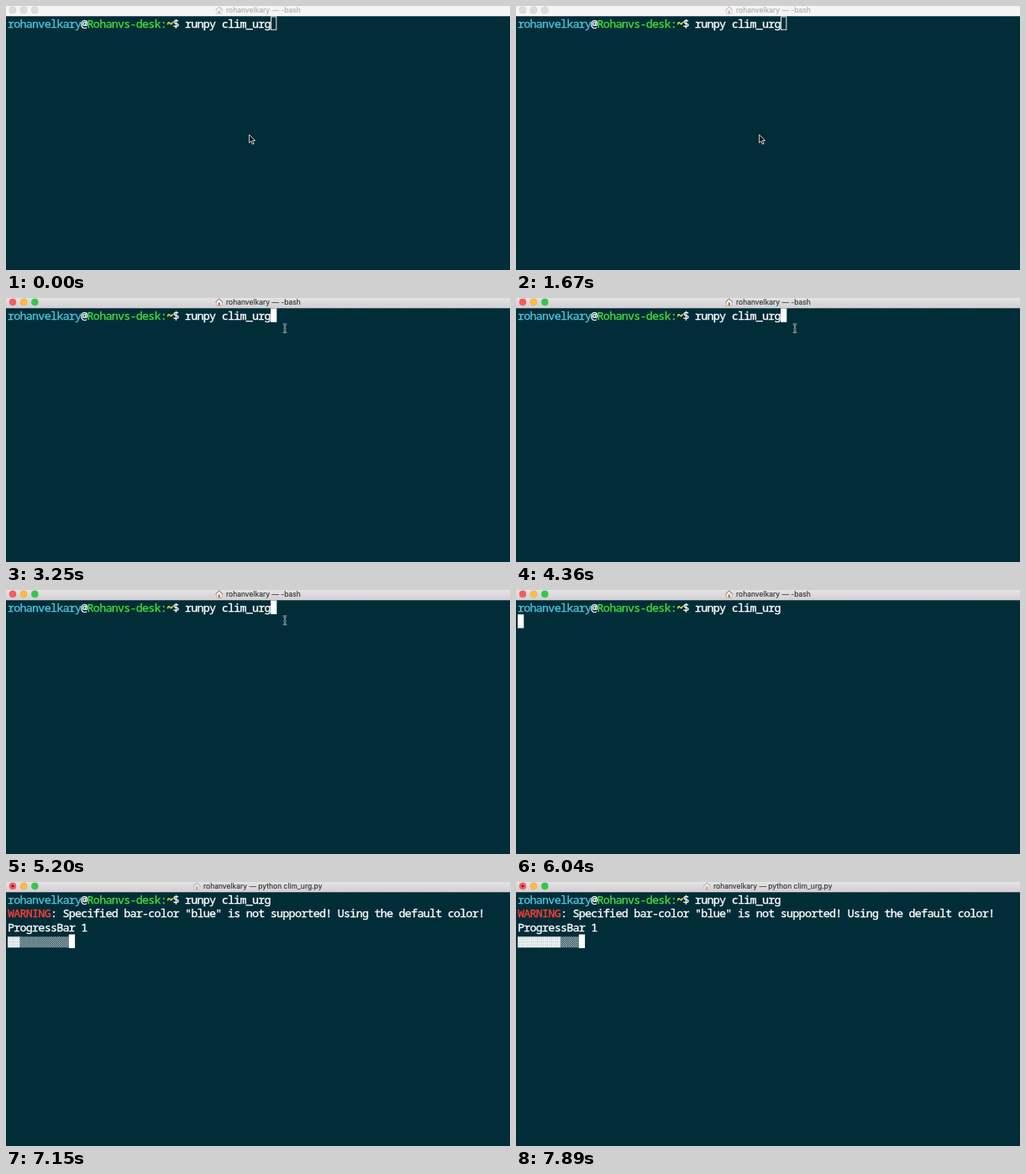
Write an HTML page that moves like this. It is 600 px wide and 315 px high and loops after 7.99 s.

```html
<!DOCTYPE html>
<html lang="en">
<head>
<meta charset="utf-8">
<title>Terminal</title>
<style>
  html, body { margin: 0; width: 100%; height: 100%; overflow: hidden; background: #002d38; }
  svg { display: block; width: 100%; height: 100%; }
  text { white-space: pre; fill: currentColor; stroke: currentColor; }
  tspan { fill: currentColor; stroke: currentColor; }
  .term { font: 500 13.4px "Noto Sans Mono", monospace; letter-spacing: -.76px; color: #fff; stroke-width: .35; }
  .title { font: 8.5px Inter, sans-serif; color: #2b2b2b; stroke-width: .1; }
  .user { color: #4fc3d9; }
  .host { color: #45d93a; }
  .path { color: #f8f23c; font-weight: 700; }
  .warn { color: #ff4034; }
  .lights circle { stroke: #0002; stroke-width: .5; }
  .inactive .title { color: #aaa; }
  .inactive #house { opacity: .5; }
  .inactive .lights circle { fill: #dcdcdc; }
  .inactive #bar { fill: #f5f5f5; }
</style>
</head>
<body>
<svg id="stage" viewBox="0 0 600 315" preserveAspectRatio="none">
  <defs>
    <linearGradient id="chrome" x2="0" y2="1">
      <stop stop-color="#e5e3e5"/><stop offset="1" stop-color="#d0ced0"/>
    </linearGradient>
    <pattern id="light" width="2.427" height="2.6" patternUnits="userSpaceOnUse">
      <path d="M0 0h1.2v1.3h-1.2zM1.2 1.3h1.2v1.3h-1.2z" fill="#d3dcde"/>
    </pattern>
    <pattern id="dense" width="2.427" height="2.6" patternUnits="userSpaceOnUse">
      <path d="M0 0h2.427v2.6h-2.427z" fill="#f0f3f3"/>
      <path d="M.6 .8h1v.9h-1z" fill="#8fa5aa"/>
    </pattern>
  </defs>

  <rect width="600" height="315" fill="#002d38"/>
  <rect id="bar" width="600" height="12.2" fill="url(#chrome)"/>
  <g class="lights">
    <circle cx="8" cy="4.9" r="4.1" fill="#fc5b57"/>
    <circle cx="21" cy="4.9" r="4.1" fill="#fdbc40"/>
    <circle cx="34.3" cy="4.9" r="4.1" fill="#34c84a"/>
  </g>
  <circle id="busyDot" cx="8" cy="4.9" r="1.4" fill="#6b1210"/>
  <g id="house">
    <path d="M1.5 4.5 4.7 1.5 8 4.5v4.7h-6.5z" fill="#fbf6ee" stroke="#8f8780" stroke-width=".5"/>
    <path d="M.3 5 4.7 .9 9.2 5" fill="none" stroke="#86766c" stroke-width="1"/>
    <path d="M3.6 5.4h2.2v3.6h-2.2z" fill="#b5604a"/>
  </g>
  <text id="title" class="title" y="8"></text>

  <text class="term" x="2" y="25.7"><tspan class="user">rohanvelkary</tspan>@<tspan class="host">Rohanvs-desk:</tspan><tspan class="path">~</tspan>$ runpy clim_urg</text>
  <g id="output">
    <text class="term" x="2" y="42.4"><tspan class="warn">WARNING</tspan>: Specified bar-color "blue" is not supported! Using the default color!</text>
    <text class="term" x="2" y="59.1">ProgressBar 1</text>
    <rect id="todo" y="65.2" height="13" fill="url(#light)"/>
    <rect id="done" x="2" y="65.2" height="13" fill="url(#dense)"/>
  </g>
  <rect id="caret" stroke="#e6eaeb" stroke-width="1"/>

  <path id="arrow" d="M0 0v9.6l2.2-2 1.6 3.7 1.7-.7-1.6-3.6h3z" fill="#111" stroke="#fff" stroke-width=".8"/>
  <g id="beam" transform="translate(332 36.3)" fill="none">
    <path d="M-2.2-5Q-.3-5 0-4Q.3-5 2.2-5M0-4V4M-2.2 5Q-.3 5 0 4Q.3 5 2.2 5M-1.5 1h3" stroke="#b9c5c8" stroke-width="2"/>
    <path d="M-2.2-5Q-.3-5 0-4Q.3-5 2.2-5M0-4V4M-2.2 5Q-.3 5 0 4Q.3 5 2.2 5M-1.5 1h3" stroke="#14282f" stroke-width=".8"/>
  </g>
</svg>
<script>
const LOOP = 7990, CELL = 7.28, ROW = 16.7, CELLS = 10;
const MOVE = 1760, ACTIVATE = 2130, ENTER = 5850, RUN = 6310, PRINT = 6800, STEP = 150;
const el = id => document.getElementById(id);
const set = (id, attrs) => {
  for (const name in attrs) el(id).setAttribute(name, attrs[name]);
};
const show = (id, visible) => set(id, { visibility: visible ? 'visible' : 'hidden' });
const smooth = p => p * p * (3 - 2 * p);
const clamp = (v, max) => Math.max(0, Math.min(max, v));

function draw(t) {
  const active = t >= ACTIVATE, running = t >= RUN, printed = t >= PRINT;

  el('stage').classList.toggle('inactive', !active);
  el('title').textContent = 'rohanvelkary — ' + (running ? 'python clim_urg.py' : '-bash');
  set('title', { x: running ? 235 : 262 });
  set('house', { transform: `translate(${running ? 222.5 : 249} 0)`, opacity: running ? .5 : 1 });
  show('busyDot', running);

  const [col, row] = printed ? [CELLS, 3] : t >= ENTER ? [0, 1] : [43, 0];
  const inset = active ? 0 : .5;
  set('caret', {
    x: 2 + col * CELL + inset, y: 12.4 + row * ROW + inset,
    width: CELL - 2 * inset, height: 16.4 - 2 * inset,
    fill: active ? '#fff' : 'none', 'stroke-opacity': active ? 0 : 1
  });

  const p = smooth(clamp((t - MOVE) / (ACTIVATE - MOVE), 1));
  set('arrow', { transform: `translate(${289.6 + 42 * p} ${153.6 - 120 * p})` });
  show('arrow', !active);
  show('beam', active && t < ENTER);

  const done = clamp(Math.floor((t - PRINT) / STEP), CELLS) * CELL;
  show('output', printed);
  set('done', { width: done });
  set('todo', { x: 2 + done, width: CELLS * CELL - done });
}

const start = performance.now();
function tick() {
  draw((performance.now() - start) % LOOP);
  requestAnimationFrame(tick);
}
tick();
</script>
</body>
</html>
```
